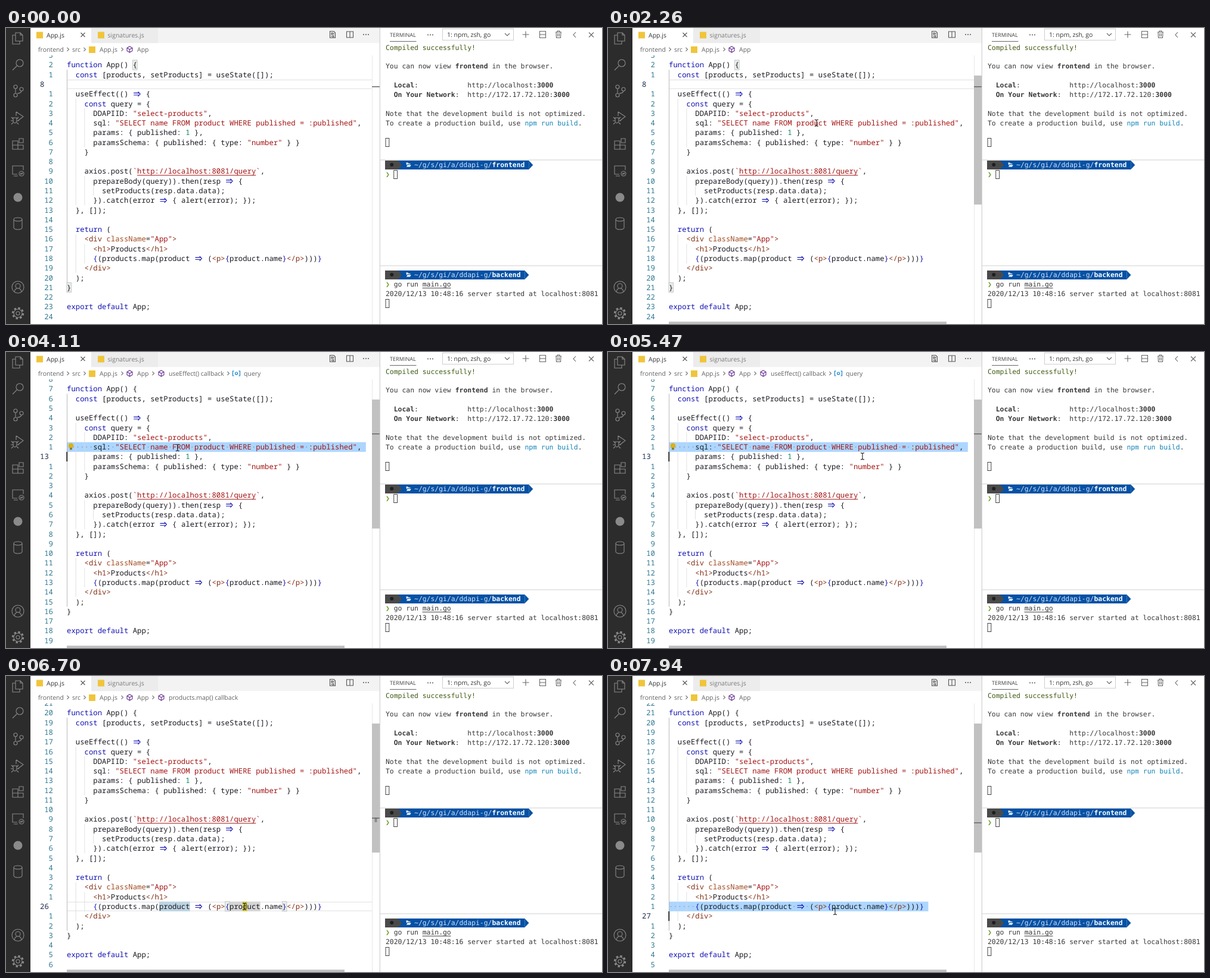
Animation of 1000 by 498 pixels, one loop 8000 ms. Source, as an HTML page:

```html
<!DOCTYPE html>
<html lang="en">
<head>
<meta charset="utf-8">
<title>Code editor</title>
<style>
  html, body { margin: 0; width: 100%; height: 100%; overflow: hidden; background: #fff; }
  svg { display: block; width: 100vw; height: 100vh; }
  text { white-space: pre; text-rendering: geometricPrecision; }
  .code { font: 12.3px "Noto Sans Mono", "DejaVu Sans Mono", monospace; }
  .term { font: 11.4px "DejaVu Sans Mono", monospace; }
  .ui { font: 10.5px "Open Sans", "Noto Sans", sans-serif; }
  .bold { font-weight: bold; }
  .icon { fill: none; stroke-width: 1.1; }
</style>
</head>
<body>
<svg viewBox="0 0 1000 498">
  <g id="under"></g>
  <g id="code"></g>
  <g id="over"></g>
  <g id="frame"></g>
  <g id="crumbs"></g>
  <path id="mouse" class="icon" stroke="#222" d="M-3-5.5Q0-5.5 0-4V4Q0 5.5-3 5.5M3-5.5Q0-5.5 0-4V4Q0 5.5 3 5.5"/>
</svg>
<script>
const LOOP = 8000;
const LEFT = 102, CHAR = 7.38, TOP = 54, ROW = 16.28;
const TERM_LEFT = 637, TERM_CHAR = 6.865;
const FIRST_LINE = 6;

const lines = `function App() {
  const [products, setProducts] = useState([]);

  useEffect(() => {
    const query = {
      DDAPIID: "select-products",
      sql: "SELECT name FROM product WHERE published = :published",
      params: { published: 1 },
      paramsSchema: { published: { type: "number" } }
    }

    axios.post(\`http://localhost:8081/query\`,
      prepareBody(query)).then(resp => {
        setProducts(resp.data.data);
      }).catch(error => { alert(error); });
  }, []);

  return (
    <div className="App">
      <h1>Products</h1>
      {(products.map(product => (<p>{product.name}</p>)))}
    </div>
  );
}

export default App;
`.split("\n");

const $ = id => document.getElementById(id);
const colX = col => LEFT + col * CHAR;
const rowY = row => TOP + row * ROW;
const escapeText = s => s.replace(/&/g, "&amp;").replace(/</g, "&lt;");
const text = (x, y, s, cls, fill, extra = "") =>
  `<text x="${x}" y="${y}" class="${cls}" fill="${fill}" ${extra}>${escapeText(s)}</text>`;
const rect = (x, y, w, h, fill, extra = "") =>
  `<rect x="${x}" y="${y}" width="${w}" height="${h}" fill="${fill}" ${extra}/>`;
const icon = (x, y, d, stroke) =>
  `<path class="icon" transform="translate(${x} ${y})" stroke="${stroke}" d="${d}"/>`;
const disc = (x, y, r, fill) => `<circle cx="${x}" cy="${y}" r="${r}" fill="${fill}"/>`;
const dots = (x, y) => [-4, 0, 4].map(dx => disc(x + dx, y, 1, "#555")).join("");
const codeText = (row, col, s, fill) => text(colX(col), rowY(row) + 12.4, s, "code", fill);
const cell = (row, col, length, fill, extra) =>
  rect(colX(col), rowY(row), length * CHAR, ROW, fill, extra);

// Code with syntax colours and indent guides
const TOKEN = /(=>|"[^"]*"|`[^`]*`|\b(?:function|const|return|export|default)\b|className|<\/?\w+>?|>|[{}]|\b\d+\b)/;
const PLAIN = "#1a1a22", KEYWORD = "#1414b4";

function tokenColor(s, inMarkup) {
  if (/^["`]/.test(s)) return "#a31515";
  if (/^[<>]/.test(s)) return "#843015";
  if (/^\d/.test(s)) return "#098658";
  if (/[{}]/.test(s) && !inMarkup) return PLAIN;
  return s === "className" ? "#a04a20" : KEYWORD;
}

function drawLine(line, row) {
  const inMarkup = line.trim().startsWith("{");
  let col = 0, out = "";
  line.split(TOKEN).forEach((part, i) => {
    if (part === "=>") {
      out += icon(colX(col), rowY(row) + 8.2, "M1.5-1.7H11M1.5 1.7H11M8.7-4L12.5 0L8.7 4", KEYWORD);
    } else if (part.trim()) {
      const indent = part.length - part.trimStart().length;
      out += codeText(row, col + indent, part.trimStart(), i % 2 ? tokenColor(part, inMarkup) : PLAIN);
      if (part[0] === "`")
        out += rect(colX(col + 1), rowY(row) + 14.2, (part.length - 2) * CHAR, 1, "#a31515");
    }
    col += part.length;
  });
  return out;
}

const indentOf = row => (lines[row] || "").search(/\S/);
function drawGuides(row) {
  const indent = lines[row] ? indentOf(row) : Math.min(indentOf(row - 1), indentOf(row + 1));
  let out = "";
  for (let col = 0; col < indent; col += 2)
    out += rect(colX(col), rowY(row), 0.8, ROW, col ? "#d8d8d8" : "#a8a8a8");
  return out;
}

// Fixed window parts
const term = (col, y, s, cls = "", color = "#383838") =>
  text(TERM_LEFT + col * TERM_CHAR, y, s, "term " + cls, color);
const hollow = (col, y) => rect(TERM_LEFT + col * TERM_CHAR, y, 5.8, 14, "none", 'stroke="#444"');
const chevron = (x, y = 36) => icon(x, y, "M-1.5-3L1.5 0L-1.5 3", "#777");
const scriptIcon = (x, y) => rect(x, y, 11, 11, "#f0c53a");
const uiText = (x, y, s, fill = "#616161") => text(x, y, s, "ui", fill);

function promptBar(mid, folder) {
  const at = col => TERM_LEFT + col * TERM_CHAR, path = "~/g/s/gi/a/ddapi-g/";
  const top = mid - 7, end = at(8 + path.length + folder.length);
  return rect(at(3) - 4, top, end - at(3) + 4, 15, "#0451a5") +
    `<path fill="#0451a5" d="M${end} ${top}l7 7.5l-7 7.5z"/>` +
    `<path fill="#4a4a4a" d="M${at(0) - 1} ${top}H${at(3)}l7 7.5l-7 7.5H${at(0) - 1}z"/>` +
    disc(at(1) + 3.4, mid, 3, "#1e1e1e") +
    `<path fill="#fff" d="M${at(5)} ${mid - 3.5}h3l1 1.5h3v1.2h-5l-1 2zM${at(5) + 2.5} ${mid + .6}h6l-2 3h-6z"/>` +
    term(7, mid + 4, path, "", "#d5e0f0") + term(7 + path.length, mid + 4, folder, "bold", "#fff");
}

function drawActivityBar() {
  const shapes = [
    [17, "M-4-9H4L8-5V5H-4ZM4-9V-5H8M-4-5H-9V10H3V5"],
    [61, "M-9 10L-2 3M-3-2A6 6 0 1 1 9-2A6 6 0 1 1-3-2"],
    [106, "M-7-7A3 3 0 1 1-1-7A3 3 0 1 1-7-7M-7 7A3 3 0 1 1-1 7A3 3 0 1 1-7 7M3-3A3 3 0 1 1 9-3A3 3 0 1 1 3-3M-4-4V4M6 0Q5 4-1 4"],
    [151, "M-3-10L9-2L0 5M-3-10V-3M-8 0H-2V6Q-5 12-8 6ZM-11-1L-8 2M1-1L-2 2M-12 5H-8M-2 5H2M-11 11L-8 8M1 11L-2 8"],
    [195, "M-9-5H0V9H-9ZM0 2H9V9H0M-9 2H0M2-9H9V-2H2Z"],
    [240, "M-1 6H-9V-8H9V-1M-7 9H0M2 5A4 4 0 1 1 10 5A4 4 0 1 1 2 5M4 4L6 5L4 7M8 3L7 5L8 6"],
    [329, "M-7-7A7 3 0 1 1 7-7A7 3 0 1 1-7-7V7A7 3 0 0 0 7 7V-7"],
    [436, "M-10 0A10 10 0 1 1 10 0A10 10 0 1 1-10 0M-4-2A4 4 0 1 1 4-2A4 4 0 1 1-4-2M-6 8Q-5 2 0 2T6 8"],
    [480, "M-3 0A3 3 0 1 1 3 0A3 3 0 1 1-3 0"],
  ];
  const gear = `<g class="icon" stroke="#8a8a8a"><circle cx="20" cy="480" r="7"/>` +
    `<circle cx="20" cy="480" r="8.7" style="stroke-width:3" stroke-dasharray="3.4 3.43"/></g>`;
  return rect(0, 0, 41, 498, "#2c2c2c") +
    shapes.map(([y, d]) => icon(20, y, d, "#8a8a8a")).join("") + disc(20, 285, 7.5, "#8a8a8a") + gear;
}

function drawEditorHeader() {
  const gray = "#555";
  return rect(41, 0, 586, 25.5, "#f3f3f3") + rect(41, 0, 102, 26, "#fff") + rect(143, 0, 112, 25.5, "#ececec") +
    rect(41, 25.5, 586, 20.5, "#fff") +
    scriptIcon(51, 6.5) + uiText(68, 16, "App.js", "#333") + icon(129, 11.5, "M-3.5-3.5L3.5 3.5M3.5-3.5L-3.5 3.5", gray) +
    scriptIcon(154, 6.5) + uiText(170.5, 16, "signatures.js", "#7a7a7a") +
    icon(548, 11, "M-4.5-5.5H2L4.5-3V5.5H-4.5ZM-2-3H0V0H-2ZM2-3V0M-2 2V4M0 2H2V4H0Z", gray) +
    icon(577, 11, "M-5.5-5H5.5V5H-5.5ZM0-5V5", gray) + dots(604, 11) +
    uiText(54, 40, "frontend") + chevron(104) + uiText(111, 40, "src") + chevron(132) +
    scriptIcon(139, 31) + uiText(157, 40, "App.js");
}

function drawTerminal() {
  const gray = "#666";
  return rect(627, 0, 373, 498, "#fff") + rect(626.8, 0, 1, 498, "#c8c8c8") +
    text(644, 15, "TERMINAL", "ui", "#424242", 'style="font-size:9.1px"') + rect(644, 22, 44.5, 1, gray) + dots(712, 11.5) +
    rect(732.5, 1.5, 119, 19, "#fff", 'stroke="#cecece"') + uiText(740, 15, "1: npm, zsh, go", "#333") +
    icon(841, 11, "M-4-2L0 2L4-2", gray) + icon(872, 11, "M-5.5 0H5.5M0-5.5V5.5", gray) +
    icon(900.5, 11, "M-5-5.5H5V5.5H-5ZM-5 0H5", gray) +
    icon(927, 11, "M-5-4H5M-2-4V-6H2V-4M-4-4L-3.5 5.5H3.5L4-4M-1.3-2V3.5M1.3-2V3.5", gray) +
    icon(954, 11.5, "M2-4.5L-2 0L2 4.5", gray) + icon(982, 11.5, "M-4-4L4 4M4-4L-4 4", gray) +
    term(0, 36.6, "Compiled successfully!", "", "#3f5a12") +
    term(0, 68.4, "You can now view ") + term(17, 68.4, "frontend", "bold") + term(26, 68.4, "in the browser.") +
    term(2, 100.2, "Local", "bold") + term(7, 100.2, ":") + term(20, 100.2, "http://localhost:") + term(37, 100.2, "3000", "bold") +
    term(2, 116.1, "On Your Network", "bold") + term(17, 116.1, ":") +
    term(20, 116.1, "http://172.17.72.120:") + term(41, 116.1, "3000", "bold") +
    term(0, 147.8, "Note that the development build is not optimized.") +
    term(0, 163.7, "To create a production build, use ") + term(34, 163.7, "npm run build", "", "#1284b8") + term(47, 163.7, ".") +
    hollow(0, 185.5) + rect(627, 221.5, 373, 1, "#cfcfcf") +
    promptBar(230, "frontend") + term(0, 250, "❯", "", "#6b9a1c") + hollow(2, 239.5) +
    rect(627, 399.5, 373, 1, "#cfcfcf") +
    promptBar(415, "backend") + term(0, 435, "❯", "", "#6b9a1c") + term(2, 435, "go run main.go") +
    rect(698.5, 437, 48, 1, "#444") +
    term(0, 450.5, "2020/12/13 10:48:16 server started at localhost:8081") + hollow(0, 456.5);
}

// Breadcrumb tail: chevron x, icon, icon colour, label x, label
const cube = "M0-5L4.5-2.5V2.5L0 5L-4.5 2.5V-2.5ZM-4.5-2.5L0 0L4.5-2.5M0 0V5";
const bracketed = "M-4-4H-6V4H-4M4-4H6V4H4M-2 0A2 2 0 1 1 2 0A2 2 0 1 1-2 0";
const wrench = "M-5 5L0 0Q-1-5 4-5L2-2L3-1L5-3Q6 2 1 1L-4 6Z";
const crumb = {
  app: [195, cube, "#652d90", 220, "App"],
  effect: [247, cube, "#652d90", 273, "useEffect() callback"],
  query: [373, bracketed, "#007acc", 399, "query"],
  sql: [434, wrench, "#424242", 459, "sql"],
  map: [247, cube, "#652d90", 273, "products.map() callback"],
};

const GRAY = "#d5d5d5", BLUE = "#bdd4e2", SELECTED = "#add6ff";
// Each entry changes part of the view from its time on
const timeline = [
  [0, { active: 2, brackets: [[0, 15], [23, 0]], marks: [], crumbs: ["app"], thick: false,
        cursor: null, selected: null, bulb: false, scroll: 0 }],
  [1180, { scroll: 0.5 }],
  [1260, { scroll: 1 }],
  [2340, { active: 6, brackets: [], cursor: [6, 34, "#000", "#fff"] }],
  [2420, { crumbs: ["app", "effect", "query", "sql"], brackets: [[4, 18], [9, 4]] }],
  [2600, { marks: [[6, 12, 53, GRAY]], thick: true }],
  [3130, { marks: [[6, 29, 7, SELECTED]], brackets: [], thick: false }],
  [3220, { active: 7, marks: [], selected: 6, cursor: null }],
  [3400, { crumbs: ["app", "effect", "query"] }],
  [3570, { bulb: true }],
  [6160, { active: 20, selected: null, cursor: [20, 40, "#d6ce32", "#444"] }],
  [6310, { bulb: false, crumbs: ["app", "map"], brackets: [[20, 36], [20, 49]] }],
  [6460, { marks: [[20, 21, 7, BLUE], [20, 37, 7, GRAY]], thick: true }],
  [7110, { marks: [[20, 37, 7, SELECTED]], brackets: [], thick: false }],
  [7210, { active: 21, marks: [], selected: 20, cursor: null, crumbs: ["app"] }],
];

function drawHighlights(s) {
  let out = "";
  if (s.selected === null) {
    for (const y of [0.2, ROW - 1.4]) out += rect(LEFT, rowY(s.active) + y, 512, 1.2, "#e4e4e4");
  } else {
    const line = lines[s.selected];
    out += cell(s.selected, 0, line.length + 1, SELECTED);
    [...line].forEach((c, col) => {
      if (c === " ") out += disc(colX(col + .5), rowY(s.selected) + 8.2, .8, "#7796b5");
    });
  }
  for (const m of s.marks) out += cell(...m);
  for (const [row, col] of s.brackets) out += cell(row, col, 1, "#e9efe9", 'stroke="#b9b9b9" stroke-width=".8"');
  return out;
}

function drawLineNumbers(active) {
  return ["", ...lines].map((_, i) => {
    const row = i - 1, here = row === active;
    const label = String(here ? row + FIRST_LINE : Math.abs(row - active));
    return here ? text(57, rowY(row) + 12.4, label, "code", "#1c2c48")
                : text(79, rowY(row) + 12.4, label, "code", "#2f7890", 'text-anchor="end"');
  }).join("");
}

function drawScrollbars(s) {
  const y = 82.4 + s.active * 7.8;
  return rect(614, 46, .8, 452, "#e4e4e4") +
    `<g opacity="${s.scroll}">${rect(614, 80, 13, 217, "#c1c1c1")}${rect(LEFT, 494, 466, 4, "#c1c1c1")}</g>` +
    (s.thick ? rect(618.5, y, 4, 7.5, "#8a8a8a") : "") + rect(614, y, 13, 1.5, "#666");
}

function drawState(s) {
  let over = drawLineNumbers(s.active) + drawScrollbars(s);
  if (s.selected !== null) over += rect(LEFT - 0.5, rowY(s.active), 1.6, ROW, "#000");
  if (s.cursor) {
    const [row, col, fill, ink] = s.cursor;
    over += cell(row, col, 1, fill) + codeText(row, col, lines[row][col], ink);
  }
  if (s.bulb) over += disc(109, 157.5, 4.2, "#e0b010") + rect(107, 161, 4, 3.5, "#8a7a40");

  $("under").innerHTML = drawHighlights(s);
  $("over").innerHTML = over;
  $("crumbs").innerHTML = s.crumbs.map(key => {
    const [x, shape, color, labelX, label] = crumb[key];
    return chevron(x) + icon(labelX - 12.5, 36, shape, color) + uiText(labelX, 40, label);
  }).join("");
}

// Pointer path: time, x, y
const path = [
  [1180, 645, 345], [1260, 520, 312], [1340, 409, 283], [1560, 372, 215], [1960, 358, 165],
  [2200, 350, 160], [2900, 347, 158], [2980, 349, 159], [3950, 349, 159], [4030, 315, 159],
  [4110, 288, 161], [4190, 276, 161], [4420, 350, 162], [4730, 442, 166], [5469, 442, 165],
  [5470, 427, 175], [5800, 408, 300], [6080, 401, 383], [6240, 400, 387], [6940, 400, 388],
  [7539, 400, 390], [7540, 370, 392], [7620, 300, 394], [7700, 289, 394], [7780, 360, 395],
  [7860, 438, 395], [7940, 381, 396],
];

function pointerAt(t) {
  const i = path.findIndex(p => p[0] > t);
  if (i < 0) return path[path.length - 1].slice(1);
  const [t0, x0, y0] = path[i - 1], [t1, x1, y1] = path[i];
  const k = (t - t0) / (t1 - t0);
  return [x0 + (x1 - x0) * k, y0 + (y1 - y0) * k];
}

$("code").innerHTML = lines.map((line, row) => drawGuides(row) + drawLine(line, row)).join("");
$("frame").innerHTML = drawEditorHeader() + drawActivityBar() + drawTerminal();

let shown = 0;
function tick(now) {
  const t = now % LOOP;
  const past = timeline.filter(([start]) => start <= t);
  if (past.length !== shown) {
    shown = past.length;
    drawState(Object.assign({}, ...past.map(([, change]) => change)));
  }
  const visible = t >= path[0][0];
  $("mouse").style.display = visible ? "" : "none";
  if (visible) $("mouse").setAttribute("transform", `translate(${pointerAt(t)})`);
  requestAnimationFrame(tick);
}
tick(0);
</script>
</body>
</html>
```
